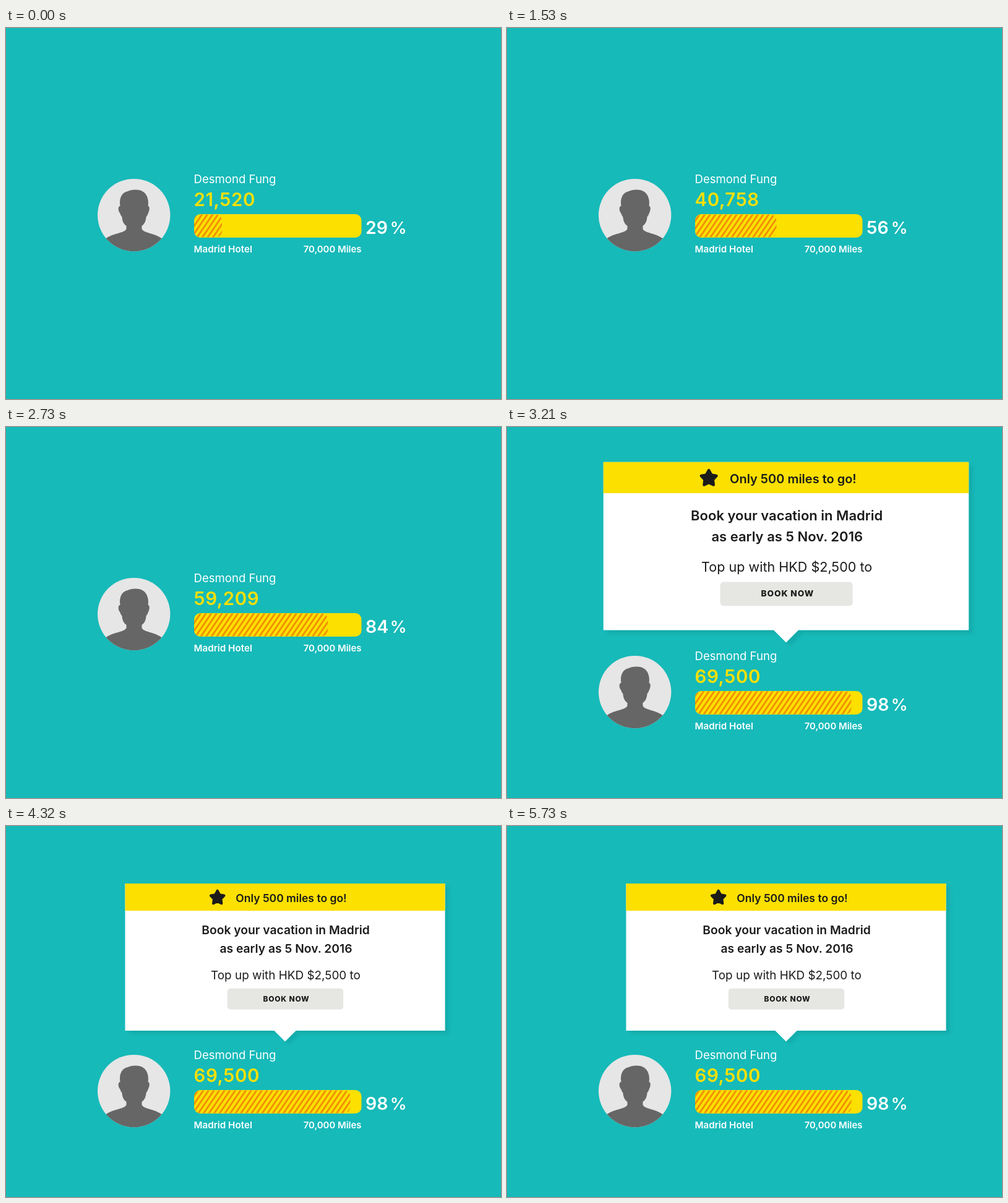
An HTML page that plays this animation: 800x600 px, repeating every 5.76 s.

```html
<!DOCTYPE html>
<html lang="en">
<head>
<meta charset="utf-8">
<title>Miles progress</title>
<style>
  html, body { margin: 0; width: 100%; height: 100%; overflow: hidden; background: #16bab9; }
  svg { display: block; width: 800px; height: 600px; font-family: Inter, Roboto, sans-serif; }
  .bold { font-weight: 600; }
  .mid { text-anchor: middle; }
</style>
</head>
<body>
<svg viewBox="0 0 800 600">
  <defs>
    <clipPath id="face"><circle cx="206.7" cy="302.6" r="58.7"/></clipPath>
    <clipPath id="filled"><rect id="fill" x="304" y="301.5" width="45" height="37" rx="10"/></clipPath>
    <filter id="shadow" x="-5%" y="-5%" width="112%" height="114%">
      <feDropShadow dx="6" dy="5" stdDeviation="2.5" flood-color="#0a6b70" flood-opacity=".18"/>
    </filter>
  </defs>
  <rect width="800" height="600" fill="#16bab9"/>

  <g id="profile">
    <circle cx="206.7" cy="302.6" r="58.7" fill="#e6e6e6"/>
    <path clip-path="url(#face)" fill="#666" d="M184.5 288C182.5 275 187 266 197 264C202 261 216 260 222 265
      C229 270 231 280 229.5 288C233 288 232 296 229.5 300C228.5 304 227 304 226.5 306C226 312 224 317 219.5 320V325
      C222 331 238 332 248 338L256 343V362H157V343L165 338C176 332 192 331 194.5 325V320
      C190 317 188 312 187.5 306C187 304 185.5 304 184.5 300C181 296 180.5 288 184.5 288Z"/>
    <text x="303.5" y="251" font-size="18.6" fill="#fff">Desmond Fung</text>
    <text id="count" class="bold" x="303.5" y="287.5" font-size="29.5" letter-spacing=".6" fill="#fbe000"></text>
    <rect x="304" y="301" width="270.5" height="38" rx="10" fill="#fbe000"/>
    <g clip-path="url(#filled)">
      <path id="stripes" fill="none" stroke="#f28d05" stroke-width="2.8"/>
    </g>
    <text id="percent" class="bold" x="581" y="333" font-size="28.5" fill="#fff"></text>
    <text x="620.5" y="333" font-size="27.5" font-weight="500" fill="#fff">%</text>
    <g class="bold" fill="#fff">
      <text x="303.5" y="363.3" font-size="15.2">Madrid Hotel</text>
      <text x="574.5" y="363.3" font-size="14.9" text-anchor="end">70,000 Miles</text>
    </g>
  </g>

  <!-- The card is laid out around its pointer tip. -->
  <g id="card">
    <g transform="translate(-451 -348.5)" fill="#1b1b1b">
      <path filter="url(#shadow)" fill="#fff" d="M192.5 93H709.5V331H468.5L451 348.5L433.5 331H192.5Z"/>
      <rect x="192.5" y="93" width="517" height="44" fill="#fbe000"/>
      <path id="star" transform="translate(341.7 116)" stroke="#1b1b1b" stroke-width="4" stroke-linejoin="round"/>
      <g class="bold mid">
        <text x="461" y="123" font-size="17.5">Only 500 miles to go!</text>
        <text x="452" y="175.3" font-size="19.3">Book your vacation in Madrid</text>
        <text x="452.5" y="205.3" font-size="19.3">as early as 5 Nov. 2016</text>
      </g>
      <text class="mid" x="452" y="248.3" font-size="18.9">Top up with HKD $2,500 to</text>
      <rect x="357.7" y="262.7" width="187.5" height="34" rx="5" fill="#e6e7e3"/>
      <text class="mid" x="453" y="283.5" font-size="12" font-weight="800" letter-spacing=".8">BOOK NOW</text>
    </g>
  </g>
</svg>
<script>
  const LOOP = 5760, STEP = 30;
  const PITCH = 8.6, STRIPE_SPEED = 4 * PITCH / 1410;
  const DROP = 126, TIP = { x: 451, y: 222.5 };
  const el = id => document.getElementById(id);

  // time, miles, percent, filled width
  const progress = [
    [0, 21520, 29, 45],
    [990, 35900, 48, 102],
    [2070, 45615, 64, 161],
    [2730, 59209, 84, 216],
    [3060, 69500, 98, 252.5]
  ];

  const mix = (a, b, u) => a + (b - a) * u;
  const ease = (t, start, end) => {
    const u = Math.min(1, Math.max(0, (t - start) / (end - start)));
    return u * u * (3 - 2 * u);
  };

  function progressAt(t) {
    const next = progress.findIndex(key => key[0] > t);
    if (next < 0) return progress[progress.length - 1];
    const a = progress[next - 1], b = progress[next];
    return a.map((v, i) => mix(v, b[i], (t - a[0]) / (b[0] - a[0])));
  }

  function starPath() {
    const points = Array.from({ length: 10 }, (_, i) => {
      const r = i % 2 ? 6 : 11.3, angle = i * Math.PI / 5;
      return `${r * Math.sin(angle)} ${-r * Math.cos(angle)}`;
    });
    return `M${points.join('L')}Z`;
  }

  function stripePath() {
    let d = '';
    for (let x = 264; x < 575; x += PITCH) d += `M${x} 341l28 -41`;
    return d;
  }

  function draw(t) {
    const [, miles, percent, width] = progressAt(t);
    el('count').textContent = Math.round(miles).toLocaleString('en-US');
    el('percent').textContent = Math.floor(percent + 1e-6);
    el('fill').setAttribute('width', width);
    el('stripes').setAttribute('transform', `translate(${t * STRIPE_SPEED % PITCH} 0)`);

    const shift = DROP * ease(t, 2870, 3195);
    el('profile').setAttribute('transform', `translate(0 ${shift})`);

    const scale = 1.142 * ease(t, 2910, 3210) - 0.142 * ease(t, 3210, 3420);
    el('card').setAttribute('transform', `translate(${TIP.x} ${TIP.y + shift}) scale(${scale})`);
    el('card').setAttribute('visibility', scale > 0 ? 'visible' : 'hidden');
  }

  el('star').setAttribute('d', starPath());
  el('stripes').setAttribute('d', stripePath());

  const begin = performance.now();
  function tick() {
    const t = (performance.now() - begin) % LOOP;
    draw(Math.floor(t / STEP) * STEP);
    requestAnimationFrame(tick);
  }
  tick();
</script>
</body>
</html>
```
